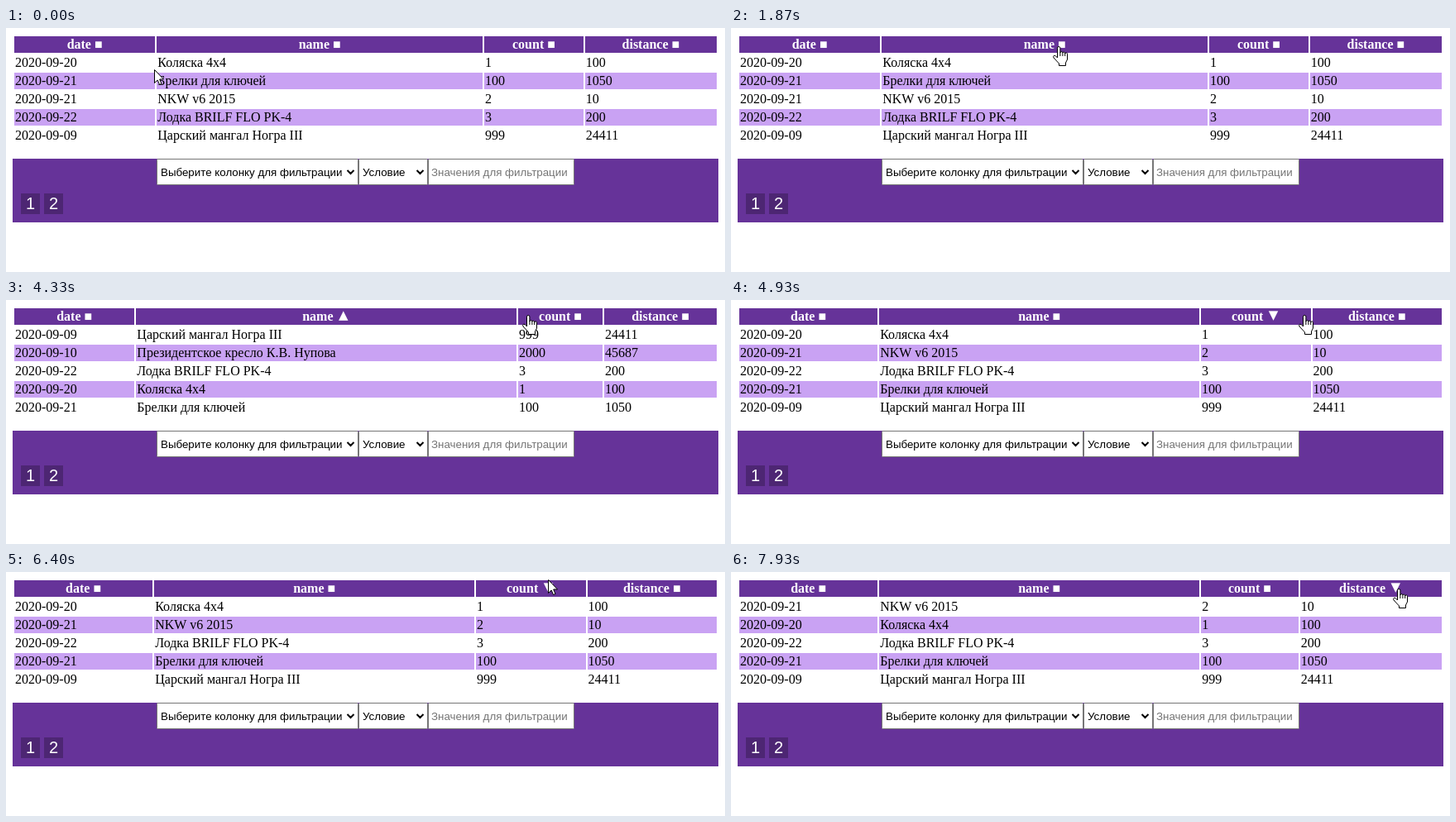
Write an HTML page that moves like this. It is 869 px wide and 295 px high and loops after 8 s.

```html
<!DOCTYPE html>
<html lang="ru">
<head>
<meta charset="utf-8">
<title>Сортировка таблицы</title>
<style>
  html, body { margin: 0; width: 100%; height: 100%; overflow: hidden; background: #fff; }
  table {
    position: absolute; left: 8px; top: 8px; width: 853px; border-spacing: 2px;
    font: 16px/18px "Liberation Serif", "Times New Roman", serif; color: #000;
  }
  th, td { padding: 1px; height: 18px; white-space: nowrap; text-align: left; }
  th { background: #639; color: #fff; text-align: center; }
  .mark {
    display: inline-block; width: 16.5px; vertical-align: 2px;
    font: bold 15px/10px "DejaVu Sans", sans-serif;
  }
  tbody tr:nth-child(even) td { background: #c9a2f3; }
  svg { position: absolute; left: 0; top: 0; }
  svg text { font: 13.333px "Liberation Sans", Arial, sans-serif; }
  .field { fill: #fff; stroke: #767676; rx: 1px; }
  .chevron { fill: none; stroke: #000; stroke-width: 2; }
  .page { fill: #4d2673; }
  svg .num { font-size: 20px; fill: #fff; text-anchor: middle; }
  .cursor { fill: #fff; stroke: #000; stroke-linejoin: round; }
</style>
</head>
<body>
<table></table>
<svg width="869" height="295">
  <rect x="8" y="158" width="853" height="77" fill="#639"/>
  <rect class="field" x="182.5" y="158.5" width="243" height="31"/>
  <rect class="field" x="426.5" y="158.5" width="83" height="31"/>
  <rect class="field" x="510.5" y="158.5" width="176" height="31"/>
  <text x="187" y="179">Выберите колонку для фильтрации</text>
  <text x="431" y="179">Условие</text>
  <text x="514" y="179" fill="#757575">Значения для фильтрации</text>
  <path class="chevron" d="M412.5 172l4 4 4-4M496.5 172l4 4 4-4"/>
  <rect class="page" x="18" y="200" width="23" height="25"/>
  <rect class="page" x="46" y="200" width="23" height="25"/>
  <text class="num" x="29.5" y="219">1</text>
  <text class="num" x="57.5" y="219">2</text>
  <path id="arrow" class="cursor" d="M.5 .5V16.5L4.2 13L6.6 18.5L9 17.5L6.7 12H11.5Z"/>
  <path id="hand" class="cursor" d="M5.5 14V2.2a1.7 1.7 0 0 1 3.4 0V8a1.5 1.5 0 0 1 3 .3a1.4 1.4 0 0 1 2.8 .7a1.4 1.4 0 0 1 2.8 .8V16L15.5 20V23.5H7.5V21L1 14Q0 12 1.5 11.2Q3 10.7 5.5 14ZM8.9 8V12M11.9 8.3V12M14.7 9V12"/>
</svg>
<script>
const STEP = 200 / 3, STEPS = 120;
const heads = ["date", "name", "count", "distance"];
const items = [
  ["2020-09-20", "Коляска 4x4", 1, 100],
  ["2020-09-21", "Брелки для ключей", 100, 1050],
  ["2020-09-21", "NKW v6 2015", 2, 10],
  ["2020-09-22", "Лодка BRILF FLO PK-4", 3, 200],
  ["2020-09-09", "Царский мангал Ногра III", 999, 24411],
  ["2020-09-10", "Президентское кресло К.В. Нупова", 2000, 45687]
];
const clicks = [
  { at: 0, col: -1 },
  { at: 35, col: 1, dir: 1 }, { at: 56, col: 1, dir: -1 },
  { at: 74, col: 2, dir: 1 }, { at: 100, col: 2, dir: -1 },
  { at: 119, col: 3, dir: 1 }
];
// pointer stops: step, x, y
const stops = [
  [0, 179, 50], [9, 414, 150], [13, 335, 200], [17, 202, 194], [21, 151, 110],
  [26, 370, 23], [28, 395, 22], [46, 395, 22], [50, 410, 20], [60, 410, 20],
  [65, 630, 18], [69, 692, 18], [79, 692, 18], [85, 592, 104], [92, 655, 7],
  [95, 655, 7], [98, 654, 16], [103, 654, 16], [105, 665, 18], [115, 802, 18],
  [STEPS, 806, 20]
];
const $ = s => document.querySelector(s);
const table = $("table"), arrow = $("#arrow"), hand = $("#hand");
const tag = (name, list) => list.map(v => `<${name}>${v}</${name}>`).join("");
let shown;

function drawTable(click) {
  if (click === shown) return;
  shown = click;
  const { col, dir } = click;
  const rows = [...items];
  if (col >= 0) rows.sort((a, b) => (a[col] > b[col] ? dir : -dir));
  const mark = `<span class="mark">${dir > 0 ? "▼" : "▲"}</span>`;
  const titles = heads.map((h, i) => `${h} ${i === col ? mark : "■"}`);
  table.innerHTML =
    `<thead><tr>${tag("th", titles)}</tr></thead>` +
    `<tbody>${tag("tr", rows.slice(0, 5).map(r => tag("td", r)))}</tbody>`;
}

const rate = (i, axis) =>
  (stops[i + 1][axis] - stops[i][axis]) / (stops[i + 1][0] - stops[i][0]);

// Speed at a stop: zero at rests and turns, so the curve never overshoots
function speed(i, axis) {
  if (i === 0 || i === stops.length - 1) return 0;
  const a = rate(i - 1, axis), b = rate(i, axis);
  return a * b > 0 ? 2 * a * b / (a + b) : 0;
}

function glide(n, axis) {
  const i = stops.findIndex(s => s[0] > n) - 1;
  const from = stops[i], to = stops[i + 1];
  const span = to[0] - from[0], k = (n - from[0]) / span, r = 1 - k;
  return Math.round(
    from[axis] + (to[axis] - from[axis]) * k * k * (3 - 2 * k) +
    span * k * r * (speed(i, axis) * r - speed(i + 1, axis) * k));
}

function drawPointer(n) {
  const x = glide(n, 1), y = glide(n, 2);
  const onHead = y >= 10 && y < 30;
  arrow.style.display = onHead ? "none" : "";
  hand.style.display = onHead ? "" : "none";
  arrow.setAttribute("transform", `translate(${x} ${y})`);
  hand.setAttribute("transform", `translate(${x - 6} ${y})`);
}

function frame() {
  const t = performance.now() % (STEP * STEPS);
  const n = Math.min(STEPS - 1, Math.floor((t + 3.4) / STEP));
  drawTable(clicks.filter(c => c.at <= n).pop());
  drawPointer(n);
  requestAnimationFrame(frame);
}
frame();
</script>
</body>
</html>
```
